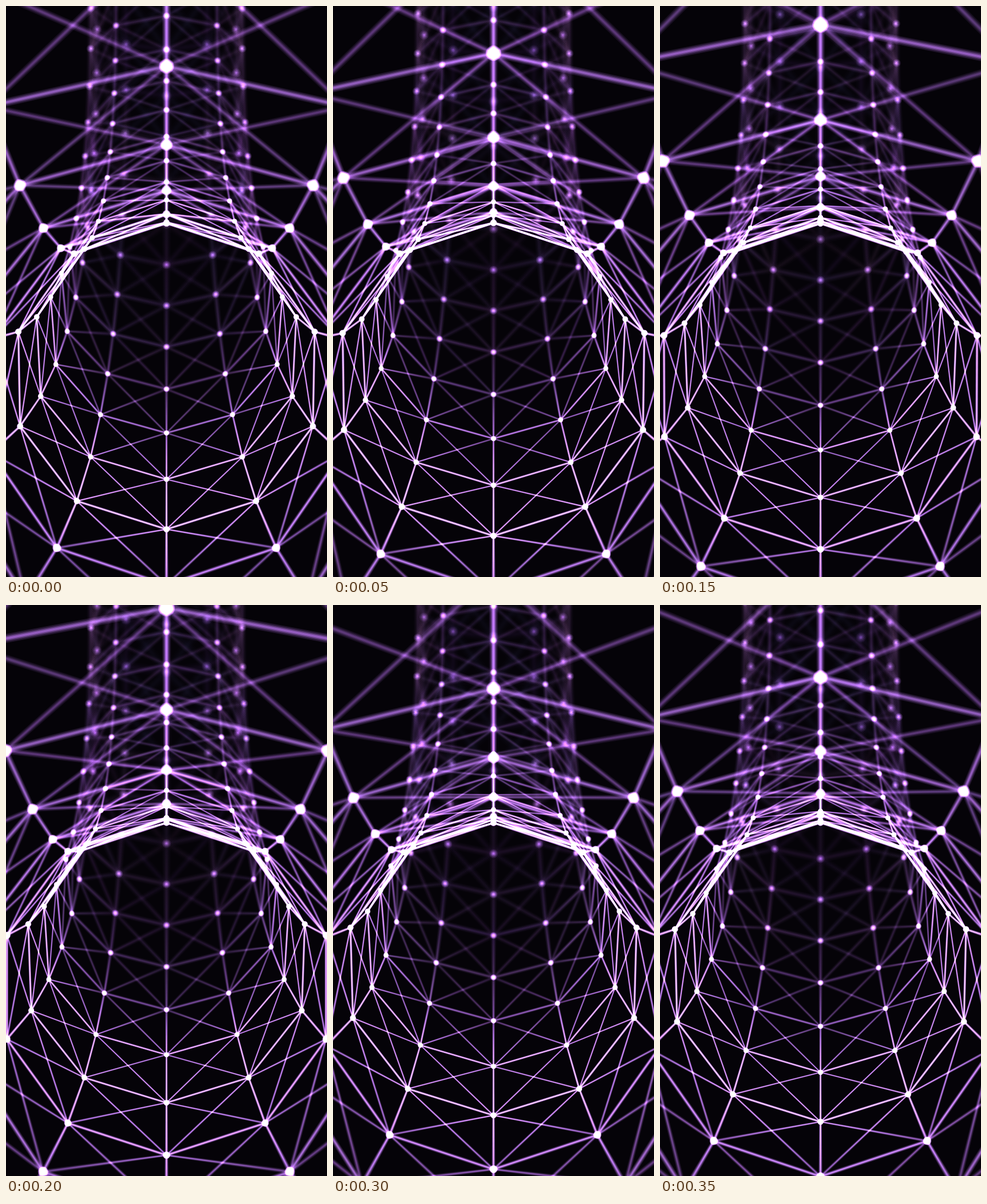
An HTML page with a canvas that plays this animation: 561 by 997 pixels, repeating every 0.4 s.

```html
<!DOCTYPE html>
<html lang="en">
<head>
<meta charset="utf-8">
<title>Wireframe tunnel</title>
<style>
  html, body { margin: 0; height: 100%; overflow: hidden; background: #050308; }
  canvas { display: block; }
</style>
</head>
<body>
<canvas id="stage" width="561" height="997"></canvas>
<script>
const W = 561, H = 997;
const ctx = document.getElementById('stage').getContext('2d');

// Torus with tube radius 1; the camera sits inside the tube.
const RINGS = 45, SIDES = 10, MAJOR = 4;
const CENTER_Y = -3.424, CENTER_Z = 3.335, FOCAL = 978, NEAR = 0.9;
const STEPS = 8, STEP_MS = 50;
const RING_ANGLE = 2 * Math.PI / RINGS;

const LINE_SIZE = 0.0082, NODE_SIZE = 0.037;
const LINE_PROFILE = [0.35, 0.65, 0.95, 1.3, 1.8];
const NODE_PROFILE = [-0.4, -0.1, 0.2, 0.5, 0.85, 1.25];

const blurAt = z => Math.max(1, 3.2 * (3.9 - z), 2.6 * (z - 4.3));

// Spread light is purple; concentrated light turns white.
function glow(energy, layers) {
  const white = 130 * energy ** 3;
  const [r, g, b] = [300, 180, 390].map(tint => Math.round((tint * energy + white) / layers));
  return `rgb(${r},${g},${b})`;
}

function project(ring, side, shift) {
  const theta = (ring + 0.5 - shift) * RING_ANGLE;
  const phi = side * 2 * Math.PI / SIDES;
  const rho = MAJOR + Math.cos(phi);
  const z = CENTER_Z + rho * Math.sin(theta);
  const y = CENTER_Y + rho * Math.cos(theta);
  const scale = FOCAL / z;
  return { x: W / 2 + Math.sin(phi) * scale, y: H / 2 + y * scale, z, scale, blur: blurAt(z) };
}

function outside(a, b) {
  const m = 15;
  return a.z < NEAR || b.z < NEAR ||
    Math.max(a.x, b.x) < -m || Math.min(a.x, b.x) > W + m ||
    Math.max(a.y, b.y) < -m || Math.min(a.y, b.y) > H + m;
}

function drawLine(a, b, weight) {
  if (outside(a, b)) return;
  const length = Math.hypot(b.x - a.x, b.y - a.y);
  if (length < 0.01) return;
  const nx = (a.y - b.y) / length / 2, ny = (b.x - a.x) / length / 2;
  const gradient = ctx.createLinearGradient(a.x, a.y, b.x, b.y);
  const [spreadA, spreadB] = [a, b].map((p, i) => {
    const width = LINE_SIZE * weight * p.scale;
    const spread = Math.hypot(width, p.blur);
    gradient.addColorStop(i, glow((width / spread) ** 1.4, LINE_PROFILE.length));
    return spread;
  });
  ctx.fillStyle = gradient;
  for (const k of LINE_PROFILE) {
    const u = k * spreadA, v = k * spreadB;
    ctx.beginPath();
    ctx.moveTo(a.x + nx * u, a.y + ny * u);
    ctx.lineTo(b.x + nx * v, b.y + ny * v);
    ctx.lineTo(b.x - nx * v, b.y - ny * v);
    ctx.lineTo(a.x - nx * u, a.y - ny * u);
    ctx.fill();
  }
}

function drawNode(p) {
  if (outside(p, p)) return;
  const size = NODE_SIZE * p.scale;
  const spread = Math.hypot(size, p.blur);
  ctx.fillStyle = glow((size / spread) ** 1.6, NODE_PROFILE.length);
  for (const k of NODE_PROFILE) {
    ctx.beginPath();
    ctx.arc(p.x, p.y, Math.max(0.4 * spread, size + k * p.blur) / 2, 0, 2 * Math.PI);
    ctx.fill();
  }
}

function draw(shift) {
  ctx.globalCompositeOperation = 'source-over';
  ctx.fillStyle = '#050308';
  ctx.fillRect(0, 0, W, H);
  ctx.globalCompositeOperation = 'lighter';

  const mesh = Array.from({ length: RINGS }, (_, ring) =>
    Array.from({ length: SIDES }, (_, side) => project(ring, side, shift)));

  mesh.forEach((ring, i) => {
    const next = mesh[(i + 1) % RINGS];
    ring.forEach((p, j) => {
      const k = (j + 1) % SIDES;
      drawLine(p, ring[k], 1);
      drawLine(p, next[j], 1);
      drawLine(p, next[k], 0.65);
      drawLine(ring[k], next[j], 0.65);
    });
  });
  mesh.flat().forEach(drawNode);
}

let shown = -1;
function tick() {
  const step = Math.floor(performance.now() / STEP_MS) % STEPS;
  if (step !== shown) {
    draw(step / STEPS);
    shown = step;
  }
  requestAnimationFrame(tick);
}
tick();
</script>
</body>
</html>
```
